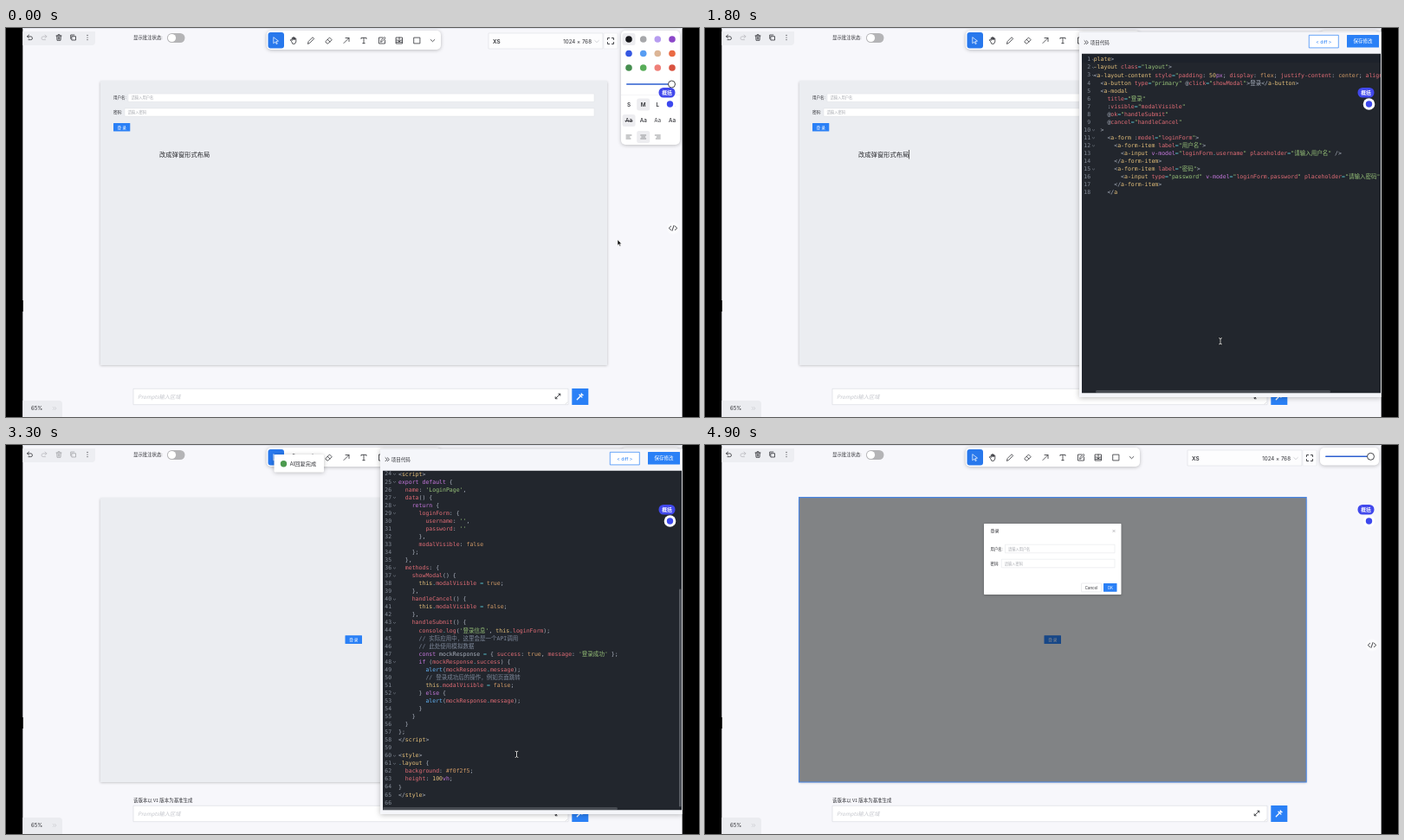
Write an HTML page with a canvas that moves like this. It is 800x450 px and loops after 5000 ms.

```html
<!DOCTYPE html>
<html lang="zh">
<head>
<meta charset="utf-8">
<style>
html, body { margin: 0; width: 100%; height: 100%; overflow: hidden; background: #000; }
canvas { display: block; width: 800px; height: 450px; }
</style>
</head>
<body>
<canvas id="stage"></canvas>
<script>
const LOOP = 5000, STEP = 100;
const UI = '"Noto Sans CJK SC", "Noto Sans", sans-serif';
const LATIN = 'Inter, "Noto Sans CJK SC", sans-serif';
const MONO = '"DejaVu Sans Mono", "Noto Sans CJK SC", monospace';
const BLUE = '#2a80f6', INK = '#303136', PALE = '#babcc2';
const canvas = document.getElementById('stage');
const c = canvas.getContext('2d');
const dpr = window.devicePixelRatio || 1;
canvas.width = 800 * dpr;
canvas.height = 450 * dpr;

const code = `<template>
  <a-layout class="layout">
    <a-layout-content style="padding: 50px; display: flex; justify-content: center; align-items: center;">
      <a-button type="primary" @click="showModal">登录</a-button>
      <a-modal
        title="登录"
        :visible="modalVisible"
        @ok="handleSubmit"
        @cancel="handleCancel"
      >
        <a-form :model="loginForm">
          <a-form-item label="用户名">
            <a-input v-model="loginForm.username" placeholder="请输入用户名" />
          </a-form-item>
          <a-form-item label="密码">
            <a-input type="password" v-model="loginForm.password" placeholder="请输入密码" />
          </a-form-item>
        </a-form>
      </a-modal>
    </a-layout-content>
  </a-layout>
</template>

<script>
export default {
  name: 'LoginPage',
  data() {
    return {
      loginForm: {
        username: '',
        password: ''
      },
      modalVisible: false
    };
  },
  methods: {
    showModal() {
      this.modalVisible = true;
    },
    handleCancel() {
      this.modalVisible = false;
    },
    handleSubmit() {
      console.log('登录信息', this.loginForm);
      // 实际应用中，这里会是一个API调用
      // 此处使用模拟数据
      const mockResponse = { success: true, message: '登录成功' };
      if (mockResponse.success) {
        alert(mockResponse.message);
        // 登录成功后的操作，例如页面跳转
        this.modalVisible = false;
      } else {
        alert(mockResponse.message);
      }
    }
  }
};
<\/script>

<style>
.layout {
  background: #f0f2f5;
  height: 100vh;
}
</style>
`;
const TOKEN = /(?<com>\/\/.*)|(?<str>'[^']*'?|(?<=\w=)(?<!(?:[:@]\w+|v-model|style)=)"[^"]*"?|")|(?<tag>(?<=<\/?)[a-z-]+|(?<=^\.)\w+|\bthis\b|\d+)|(?<kw>v-model|\b(?:export|default|return|const|if|else)\b|(?<=\d)(?:px|vh))|(?<atom>#\w+|(?<=: )[a-z]+\b|\b(?:true|false)\b)|(?<fn>alert)|(?<op>[=.])|(?<def>(?<=const )\w+)|(?<prop>[\w-]+)/g;
const THEME = { com: '#7d8799', str: '#98c379', tag: '#e5c07b', kw: '#c678dd', atom: '#d19a66',
  fn: '#61afef', op: '#56b6c2', def: '#abb2bf', prop: '#e06c75' };
const FOLD = /\{$|^\s*(<[a-z][^\/]*)?>$/;

const mark18 = code.indexOf('        </a-form>') + 11;
const mark52 = code.indexOf(' else {');
const typing = [[1300, 0], [1800, mark18], [2700, mark52], [3050, code.length]];
const pointer = [[0, 706, 245], [300, 661, 425], [500, 661, 425], [900, 595, 361.5], [3100, 595, 361.5],
  [3300, 589.5, 357], [3500, 440, 16], [3700, 407.5, 197], [4000, 402, 225]];

const clamp = v => Math.max(0, Math.min(1, v));
const ramp = (t, a, b) => clamp((t - a) / (b - a));
const easeOut = p => 1 - (1 - p) ** 3;

function along(keys, t, k = 1) {
  let i = 0;
  while (i < keys.length - 1 && keys[i + 1][0] <= t) i++;
  const a = keys[i], b = keys[i + 1] || a;
  return a[k] + (b[k] - a[k]) * (a === b ? 0 : ramp(t, a[0], b[0]));
}

function text(s, x, y, size, color = INK, { align = 'left', weight = 400, font = UI, style = '' } = {}) {
  c.font = `${style} ${weight} ${size}px ${font}`;
  c.textAlign = align;
  c.textBaseline = 'alphabetic';
  c.fillStyle = color;
  c.fillText(s, x, y + size * 0.37);
}

function box(x, y, w, h, fill, { r = 0, line, lw = 0.6, shadow = 0 } = {}) {
  c.save();
  c.beginPath();
  c.roundRect(x, y, w, h, r);
  if (shadow) {
    c.shadowColor = 'rgba(0,0,0,.25)';
    c.shadowBlur = shadow * dpr;
    c.shadowOffsetY = 0.8 * dpr;
  }
  if (fill) { c.fillStyle = fill; c.fill(); }
  c.shadowColor = 'transparent';
  if (line) { c.strokeStyle = line; c.lineWidth = lw; c.stroke(); }
  c.restore();
}

function dot(x, y, r, fill, line, lw = 0.8) {
  c.beginPath();
  c.arc(x, y, r, 0, 7);
  if (fill) { c.fillStyle = fill; c.fill(); }
  if (line) { c.strokeStyle = line; c.lineWidth = lw; c.stroke(); }
}

function icon(x, y, d, color = INK, lw = 0.8, fill) {
  c.save();
  c.translate(x, y);
  const p = new Path2D(d);
  if (fill) { c.fillStyle = fill; c.fill(p); }
  c.strokeStyle = color;
  c.lineWidth = lw;
  c.lineJoin = c.lineCap = 'round';
  c.stroke(p);
  c.restore();
}

const CHEVRON = 'M-2.3-1L0 1.2 2.3-1';
const TOOLS = [
  [332, 'M-2.5 1L-3.8-.6-2.8-1.2-1.8 0V-3H-.8V-1-3.8H.4V-1-3.4H1.6V-1-2.4H2.8V1.5L1.5 3.8H-.8Z'],
  [352, 'M-3.5 3.5L-2.8 1 2-3.8 3.6-2.2-1.2 2.7Z'],
  [372.5, 'M-3.5 1L1-3.5 3.7-.8-.8 3.5H-1.5ZM-1.3-1.2L1.4 1.5'],
  [393, 'M-3 3L3-3M-1-3H3V1'],
  [413, 'M-3-2V-3.2H3V-2M0-3.2V3.2M-1.2 3.2H1.2'],
  [434, 'M1-3.5H-3.5V3.5H3.5V-.5M-1.4 1.5L-1-.2 2.8-4 4-2.8.2 1Z'],
  [454, 'M-3.5-3.5H3.5V3.5H-3.5ZM-3.5-.5H-1.5L0 1.5 1.5-.5H3.5M0-3.5V1.2M-3.5 1.8H3.5'],
  [474.5, 'M-3.4-3.4H3.4V3.4H-3.4Z'],
  [492.5, CHEVRON]
];

function chrome(t) {
  const idle = t >= 3100 && t < 4000 ? '#a5a6aa' : INK;
  box(19, 0, 762, 450, '#f7f7fb');
  box(19, 0, 762, 1, '#e1e4ec');
  box(19, 4, 84, 16, '#edeef2', { r: [0, 0, 4, 0] });
  icon(27.5, 11, 'M-1-3L-3-1.2-1 .6M-3-1.2H1Q3-1 3 .8 3 2.6 1 2.6H-1.5');
  icon(44, 11, 'M1-3L3-1.2 1 .6M3-1.2H-1Q-3-1-3 .8-3 2.6-1 2.6H1.5', '#bbbcc1');
  icon(61, 11, 'M-3-2H3M-1-2V-3.3H1V-2M-2.3-2L-2 3.3H2L2.3-2M-.7-.5V2M.7-.5V2', idle);
  icon(77.5, 11, 'M-1.3-1.3H3V3H-1.3ZM-2.8 1.3V-3H1.4', idle);
  for (const y of [8.4, 11, 13.6]) dot(94, y, 0.55, INK);
  text('显示批注状态:', 147, 11, 5.4);
  box(186, 6, 20.5, 11, '#b4b4b6', { r: 5.5 });
  dot(191.5, 11.5, 4.6, '#fff');

  box(301, 3, 201, 22, '#fff', { r: 5, shadow: 4 });
  box(302.5, 5, 18.5, 18.5, '#2878ec', { r: 3 });
  icon(311.5, 14.5, 'M-2.4-3.6L3 .6.4 1 1.8 3.6.6 4-.6 1.6-2.4 3Z', '#fff', 0.7);
  for (const [x, d] of TOOLS) icon(x, 14.5, d);

  box(557, 6, 132, 18, '#fdfdfe', { line: '#dcdde2' });
  text('XS', 562, 15.3, 6.4, INK, { weight: 600, font: LATIN });
  text('1024 × 768', 676, 15.3, 6.2, INK, { align: 'right', font: LATIN });
  icon(682, 15.5, CHEVRON, '#b9bbc2', 0.6);
  box(690, 6, 16, 18, '#fdfdfe', { line: '#e6e7eb' });
  icon(698, 15, 'M-1.5-3.5H-3.5V-1.5M1.5-3.5H3.5V-1.5M-3.5 1.5V3.5H-1.5M3.5 1.5V3.5H1.5', INK, 0.9);

  dot(770, 231.5, 7, '#fbfbfd');
  icon(770, 231.5, 'M-2.4-2.2L-4.8 0-2.4 2.2M2.4-2.2L4.8 0 2.4 2.2M1-3L-1 3', INK, 0.9);
  box(19, 315, 1, 13, '#000');
  box(19, 431, 46, 19, '#ebecf0', { r: [0, 4, 0, 0] });
  text('65%', 29, 440, 6, INK, { font: LATIN });
  icon(56, 440, 'M-1.8-1.6L-.2 0-1.8 1.6M.4-1.6L2 0 .4 1.6', '#c3c4ca', 0.6);

  if (t >= 3100) text('该版本以 V1 版本为基准生成', 147, 411.3, 5.45);
  box(147, 417.3, 502, 18.4, '#fff', { line: '#d5d7dd' });
  text('Prompts输入区域', 152, 426.3, 6.2, '#c3c5cb', { style: 'italic' });
  icon(637, 426, 'M-2.6 2.6L2.6-2.6M.8-2.8H2.8V-.8M-2.8.8V2.8H-.8', INK, 0.9);
  icon(647, 434, 'M-1 1L1-1', '#b5b6bb', 0.4);
  box(653.3, 417, 19, 19, BLUE);
  icon(662.5, 426.5, 'M-3.2 3.2L1-1M1.8-3.6V-2M3.6-1.8H2.2M-.6-2.4L0-1.8M2.4.6L1.8 0M1.2-1.2L2.6-2.6', '#fff', 1.3);
}

const SWATCHES = ['#16171a', '#a6a7aa', '#b79df0', '#8b46c8', '#3558e2', '#579df3',
  '#dcb596', '#ea6a43', '#468e4f', '#58ad59', '#ef8079', '#d9523f'];
const COLS = [719, 735.7, 752.3, 769];

function row(y, chosen, draw) {
  COLS.forEach((x, i) => {
    if (i === chosen) box(x - 7.5, y - 7, 15, 14, '#ededf0', { r: 2.5 });
    draw(x, y, i);
  });
}

function slider(y) {
  box(716, y - 0.8, 52, 1.6, '#2c5fd0', { r: 0.8 });
  dot(768.5, y, 4, '#fff', INK, 0.9);
}

function panel(t) {
  if (t >= 4000) {
    box(710, 3, 68, 20.5, '#fff', { r: 5, shadow: 4 });
    return slider(13.3);
  }
  box(710, 3, 68, 132, '#fff', { r: 5, shadow: 4 });
  for (let k = 0; k < 3; k++)
    row(13 + 16.5 * k, k ? -1 : 0, (x, y, i) => dot(x, y, 3.8, SWATCHES[k * 4 + i]));
  slider(65);
  box(710, 77, 68, 0.6, '#ececf0');
  const sizes = (x, y, i) => text(['S', 'M', 'L', 'XL'][i], x, y, 6.3, INK, { align: 'center', weight: 600, font: LATIN });
  if (t >= 3100) {
    row(88.5, 0, (x, y, i) => icon(x, y, 'M-3-2H2V3H-3ZM-2-3H3V2', INK, 0.9, i === 2 ? '#b9babd' : undefined));
    row(107, 0, (x, y, i) => {
      c.setLineDash(i === 1 ? [1.6, 1] : []);
      dot(x, y, 3.2, null, i === 2 ? '#77787c' : INK, i ? 0.9 : 1.5);
      c.setLineDash([]);
    });
    row(125.5, 1, sizes);
  } else {
    row(88.5, 1, sizes);
    row(107, 0, (x, y, i) => {
      text('Aa', x, y, 6.3, INK, { align: 'center', weight: 500, font: i === 2 ? UI : LATIN });
      if (!i) box(x - 4.5, y, 9, 0.7, INK);
    });
    row(126, 1, (x, y, i) => {
      if (i < 3) icon(x, y, ['M-3-2H3M-3 0H1M-3 2H2', 'M-3-2H3M-2 0H2M-3 2H3', 'M-3-2H3M-1 0H3M-2 2H3'][i], '#66676c', 0.7);
    });
  }
}

function field(label, hint, x, y, left, right, size, h) {
  text(label, x, y, size, INK, { weight: 500 });
  box(left, y - h / 2, right - left, h, '#fff', { line: '#dfe0e5', lw: 0.5 });
  text(hint, left + 3.5, y, size * 0.96, '#a9abb1');
}

function button(s, x, y, w, h, size = 4.6) {
  box(x, y, w, h, BLUE, { r: 0.5 });
  text(s, x + w / 2, y + h / 2, size, '#fff', { align: 'center', weight: 500 });
}

function artboard(t) {
  box(109, 61, 585, 329, '#ebedf1', { shadow: 3 });
  if (t < 3100) {
    field('用户名:', '请输入用户名', 124, 80.7, 141, 679, 4.5, 9.2);
    field('密码:', '请输入密码', 124, 97.5, 137, 679, 4.5, 9.2);
    button('登 录', 124, 110, 19.3, 9.6);
    text('改成弹窗形式布局', 177, 146.2, 7.3, '#2b2c30');
    if (t >= 1300) box(235, 141, 0.7, 10.5, '#222');
  } else {
    button('登 录', 391.5, 220.3, 19.5, 9.8);
  }
  const shade = ramp(t, 4100, 4500);
  if (shade) box(109, 61, 585, 329, `rgba(0,0,0,${0.45 * shade})`);
  if (t >= 3700) box(108.6, 60.6, 585.6, 329.4, null, { line: '#4886e6', lw: 1.1 });
  const show = easeOut(ramp(t, 4200, 4600));
  if (show) modal(show);
}

function modal(p) {
  const s = 0.3 + 0.7 * p;
  c.save();
  c.globalAlpha = p;
  c.translate(401, 225);
  c.scale(s, s);
  c.translate(-401, -225);
  box(322, 91, 158.5, 82, '#fff', { r: 0.8, shadow: 3 });
  text('登录', 329.5, 99.3, 5, INK, { weight: 500 });
  icon(472, 99.5, 'M-1.2-1.2L1.2 1.2M1.2-1.2L-1.2 1.2', '#88898e', 0.5);
  field('用户名:', '请输入用户名', 329.5, 120, 346.5, 473, 4.4, 9.6);
  field('密码:', '请输入密码', 329.5, 137, 342.3, 473, 4.4, 9.6);
  box(434.5, 160, 23, 9.8, '#fff', { r: 0.5, line: '#d9dade', lw: 0.5 });
  text('Cancel', 446, 165, 4.4, INK, { align: 'center', font: LATIN });
  button('OK', 460, 160, 15.5, 9.8, 4.4);
  c.restore();
}

function codeLine(line, x, y) {
  const put = (s, color) => {
    if (!s) return;
    text(s, x, y, 6.53, color, { font: MONO });
    x += c.measureText(s).width;
  };
  let at = 0;
  for (const m of line.matchAll(TOKEN)) {
    put(line.slice(at, m.index), '#abb2bf');
    put(m[0], THEME[Object.keys(m.groups).find(k => m.groups[k])]);
    at = m.index + m[0].length;
  }
  put(line.slice(at), '#abb2bf');
}

function editor(t) {
  const H = 9.05, top = 36, gray = '#858d99', view = 390;
  const typed = Math.floor(along(typing, t));
  const lines = code.slice(0, typed).split('\n');
  const sy = Math.max(0, top + (lines.length - 1) * H - 413.2);
  const sx = t >= 1500 && t < 2200 ? 20 : 0;
  c.save();
  c.beginPath();
  c.rect(435, 29.5, 345, 393);
  c.clip();
  box(435, 29.5, 345, 393, '#22262d');
  if (!sy) box(435, 31.3, 345, 9, '#1d222b');
  c.save();
  c.beginPath();
  c.rect(449, 29.5, 331, 393);
  c.clip();
  lines.forEach((line, i) => codeLine(line, 453 - sx, top + i * H - sy));
  if (!typed) text('Code goes here...', 451.5, top, 6.53, '#8d939c', { font: MONO });
  c.restore();
  lines.forEach((line, i) => {
    const y = top + i * H - sy;
    text(i + 1, typed ? 445 : 442.5, y, 6.4, gray, { font: MONO, align: 'right' });
    if (FOLD.test(line)) icon(448.5, y + 0.7, 'M-1.2-.5L0 .6 1.2-.5', gray, 0.6);
  });
  if (lines.length > 3) box(435 + sx * 0.8, 419, 271, 3, '#474b52', { r: 1.5 });
  if (sy) {
    const full = lines.length * H + 6;
    box(777, 30 + sy / full * view, 2.4, view * view / full, '#565a61', { r: 1.2 });
  }
  c.restore();
}

function drawer(t) {
  const slide = easeOut(ramp(t, 500, 800)) * (1 - easeOut(ramp(t, 3450, 3700)));
  if (!slide) return;
  c.save();
  c.translate(349 * (1 - slide), 0);
  box(432, 4.5, 349, 422.5, '#f5f6fa', { shadow: 6 });
  box(432, 4.5, 349, 0.6, '#dfe1e8');
  icon(440, 16.7, 'M-2-2L0 0-2 2M.4-2L2.4 0 .4 2', INK, 0.8);
  text('项目代码', 444.7, 16.7, 5.5, INK);
  box(697.3, 8.3, 34, 14.6, '#fff', { line: BLUE, lw: 0.7 });
  text('< diff >', 714.3, 15.7, 5.2, BLUE, { align: 'center', font: LATIN });
  button('保存修改', 741, 8, 37, 14.5, 5.5);
  editor(t);
  c.restore();
}

function loading(t) {
  const a = ramp(t, 300, 500) * (1 - ramp(t, 1200, 1400));
  if (!a) return;
  c.save();
  c.globalAlpha = a;
  box(19, 0, 762, 450, 'rgba(243,245,250,.37)');
  [0.85, 0.45, 0.75, 1].forEach((alpha, i) => {
    const ang = (0.3 * (t - 1200) - 100 + 90 * i) * Math.PI / 180;
    c.globalAlpha = a * alpha;
    dot(338 + 6.2 * Math.cos(ang), 222 + 6.2 * Math.sin(ang), 2.5, BLUE);
  });
  c.globalAlpha = a;
  text('代码拼命生成中...', 338, 237.5, 6.5, BLUE, { align: 'center', weight: 500 });
  c.restore();
}

function toast(t) {
  if (t < 3100 || t >= 3600) return;
  c.save();
  const p = ramp(t, 3000, 3200);
  c.globalAlpha = p * (1 - ramp(t, 3400, 3600));
  c.translate(0, -14 * (1 - p));
  box(309.5, 11, 57.5, 20.5, '#fff', { r: 1.5, shadow: 5 });
  dot(320.5, 21.7, 3.7, '#4c9a4f');
  text('AI回复完成', 327.8, 21.7, 6.2, INK);
  c.restore();
}

function badge() {
  dot(766.5, 88, 6.8, '#fff');
  dot(766.5, 88, 3.7, '#3d48ee');
  box(753.5, 69, 19, 11.5, '#4148ec', { r: 5.5 });
  text('概括', 763, 74.7, 5.8, '#fff', { align: 'center', weight: 700 });
}

function cursor(t) {
  if (t >= 4600) return;
  const x = along(pointer, t, 1), y = along(pointer, t, 2);
  if (t >= 1300 && t < 3400) {
    const beam = 'M-1.5-3.6Q0-3.6 0-2.6 0-3.6 1.5-3.6M0-2.6V2.6M-1.5 3.6Q0 3.6 0 2.6 0 3.6 1.5 3.6';
    icon(x, y + 0.8, beam, 'rgba(0,0,0,.6)', 2);
    icon(x, y + 0.8, beam, '#fff', 0.8);
  } else {
    icon(x, y, 'M0 0V6.4L1.5 5.1 2.6 7.6 3.7 7.1 2.6 4.7H4.6Z', '#fff', 0.5, '#111');
  }
}

function draw(now) {
  const t = Math.floor((now % LOOP) / STEP) * STEP;
  c.setTransform(dpr, 0, 0, dpr, 0, 0);
  box(0, 0, 800, 450, '#000');
  c.save();
  c.beginPath();
  c.rect(19.3, 0, 761.4, 450);
  c.clip();
  chrome(t);
  artboard(t);
  panel(t);
  drawer(t);
  loading(t);
  toast(t);
  badge();
  cursor(t);
  c.restore();
}

const start = performance.now();
function tick() {
  draw(performance.now() - start);
  requestAnimationFrame(tick);
}
tick();
</script>
</body>
</html>
```
